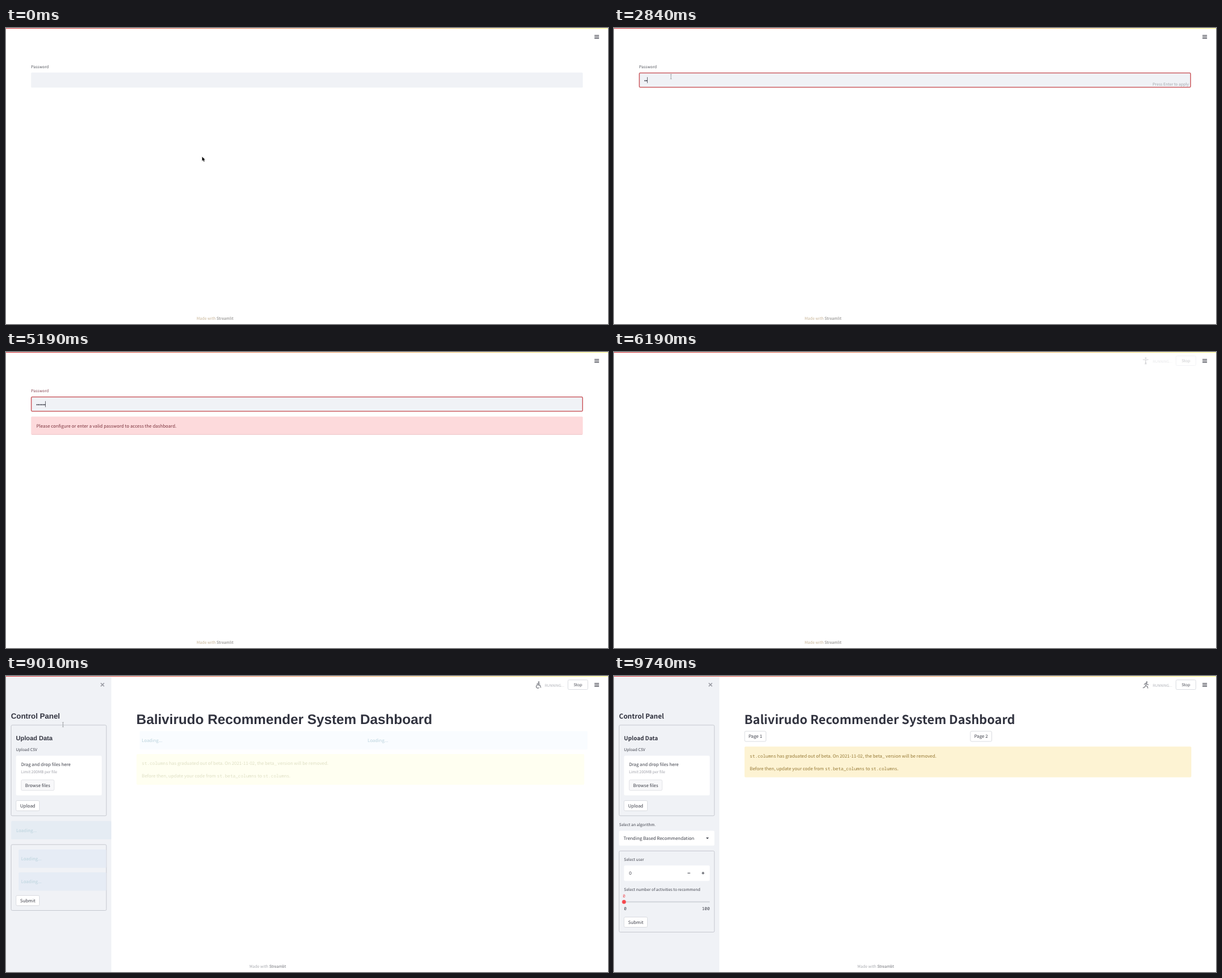
These frames come from a looping animation (1000 px wide and 493 px high, 9860 ms). An HTML page:

```html
<!DOCTYPE html>
<html lang="en">
<head>
<meta charset="utf-8">
<title>Dashboard login</title>
<style>
html, body { margin: 0; width: 100%; height: 100%; overflow: hidden; background: #fff; }
svg { display: block; width: 100vw; height: 100vh; }
text { font-family: "Noto Sans CJK JP", "Noto Sans CJK SC", "Noto Sans CJK KR", "Noto Sans CJK", "Open Sans", sans-serif; text-rendering: geometricPrecision; white-space: pre; }
.mono { font-family: "Noto Sans Mono", "DejaVu Sans Mono", monospace; }
.plain { font-family: "Liberation Sans", Arial, sans-serif; }
</style>
</head>
<body>
<svg id="stage" viewBox="0 0 1000 493" preserveAspectRatio="none"></svg>
<script>
const LOOP = 9860;
const SCALE = 1000 / 1920;  // page pixels to stage pixels
const CJK = 1.118;          // Latin glyphs in the CJK face are drawn larger
const INK = '#3f414b';
const stage = document.getElementById('stage');

const between = (t, a, b) => t >= a && t < b;
// value of the last [time, value] pair that has begun
const at = (t, pairs) => pairs.reduce((v, [start, next]) => t >= start ? next : v, null);

function text(x, y, str, size = 16, fill = INK, o = {}) {
  const px = size * SCALE / (o.face ? 1 : CJK);
  return `<text x="${x}" y="${y}" font-size="${px.toFixed(3)}" fill="${fill}"` +
    ` font-weight="${o.weight || 400}" text-anchor="${o.anchor || 'start'}" class="${o.face || ''}">${str}</text>`;
}
const mono = (x, y, str, fill, size = 14) => text(x, y, str, size, fill, { face: 'mono' });

function rect(x, y, x2, y2, fill, stroke = 'none', r = 2, w = 1) {
  return `<rect x="${x}" y="${y}" width="${x2 - x}" height="${y2 - y}" rx="${r}" fill="${fill}" stroke="${stroke}" stroke-width="${w}"/>`;
}
const path = (d, stroke, w = 1, fill = 'none') =>
  `<path d="${d}" fill="${fill}" stroke="${stroke}" stroke-width="${w}"/>`;
const fade = (a, body) => a > 0 ? `<g opacity="${a}">${body}</g>` : '';

function button(x, y, x2, label, y2 = y + 17, size = 16) {
  return rect(x, y, x2, y2, '#fff', '#d4d6db', 2, .8) +
    text((x + x2) / 2, (y + y2) / 2 + (size > 14 ? 2.8 : 2.4), label, size, INK, { anchor: 'middle' });
}

function chrome() {
  return '<defs><linearGradient id="bar"><stop stop-color="#d9474d"/><stop offset=".5" stop-color="#ecA070"/>' +
    '<stop offset="1" stop-color="#fbf88c"/></linearGradient></defs>' +
    '<rect width="1000" height="1.1" fill="url(#bar)"/>' +
    path('M977.5 12.4h7.6M977.5 14.9h7.6M977.5 17.4h7.6', '#4c4e57', 1.2);
}

function footer(x, warm) {
  return text(x, 486, 'Made with', 14, warm ? '#c6b294' : '#a6a8ad') +
    text(x + 33, 486, 'Streamlit', 14, warm ? '#7d7b78' : '#6a6c72');
}

const poses = {
  stand: 'M878.6 12.6l4.6 .5l4.6 -.5M883.2 13v4M883.2 16l-1 4.5M883.2 16l1 4.5',
  wheel: 'M884 12l1.2 3.6h2l1.2 4M881.5 13.5l3 -1.2l2.6 1.4M884 15a2.6 2.6 0 1 0 1.6 4',
  run: 'M884.4 11.8l-1.2 4.2l3 1.6l.6 3M883.2 16l-1.6 2.4l-3 1.4M880.6 14.6l1.6 -2l2.2 -.6l1.6 2.2l2 .4',
  ride: 'M884 12l-2 3.4l3 1.4l-.6 3.6M884 12.6l3.4 2M878.6 20.4h10'
};
function status(pose, a) {
  const hx = pose === 'stand' ? 883.2 : 885;
  return fade(a, `<circle cx="${hx}" cy="10.2" r="1.3" fill="#85878d"/>` + path(poses[pose], '#85878d', 1.3) +
    text(895, 17.6, 'RUNNING...', 12.9, '#b0b2b8') + button(933.5, 6.5, 966.5, 'Stop', 22.5, 14));
}

const arrow = () => path('M325.7 214.2v7.4l1.7 -1.5l1.1 2.6l1.4 -.6l-1.1 -2.5h2.2z', '#fff', .3, '#000');
const beam = () => path('M93.4 77.2h.8l.5 .4l.5 -.4h.8M94.7 77.5v7M93.4 84.8h.8l.5 -.4l.5 .4h.8', '#85878c', .7);

function field(s) {
  let out = text(41.8, 67.1, 'Password', 14, s.label, { weight: s.label === '#a7b3cb' ? 700 : 400 }) +
    rect(41.6, 74.3, 958.2, 99.2, '#f0f2f6', 'none', 1.5) +
    fade(s.focus, rect(42.1, 74.8, 957.7, 98.7, 'none', '#c94f54', 1.5, 1.3));
  for (let i = 0; i < s.dots; i++) out += `<circle cx="${51.5 + i * 2.55}" cy="87.8" r="1.05" fill="#3a3b46"/>`;
  if (s.caret) out += path(`M${50.4 + s.dots * 2.52} 81.8v10`, '#4a4b55', .8);
  if (s.hint) out += text(955, 96.4, 'Press Enter to apply', 14, '#a1a3a9', { anchor: 'end' });
  return out;
}

const errorBox = () => rect(41.6, 107.6, 958.2, 137.8, '#fddadc', 'none', 1.5) +
  path('M43 137.4h914', '#ecc3c6', .8) +
  text(50.4, 125.9, 'Please configure or enter a valid password to access the dashboard.', 16, '#7d353f');

function loginState(t) {
  return {
    label: at(t, [[0, '#55575f'], [4570, '#85404e'], [6190, '#a7b3cb']]),
    focus: at(t, [[0, 0], [990, .5], [1110, 1], [6190, 0], [7050, .5], [7170, 1]]),
    dots: at(t, [[0, 0], [2470, 1], [2840, 2], [3090, 3], [3340, 4], [3710, 5], [3960, 6],
      [6190, 0], [8030, 1], [8280, 2]]),
    caret: between(t, 1110, 1480) || between(t, 2100, 4690) || between(t, 5190, 6190) ||
      between(t, 7170, 7660) || t >= 8030,
    hint: between(t, 2470, 4330) || between(t, 8030, 8650)
  };
}

function login(t) {
  const blank = between(t, 6190, 6430) || t >= 8770;
  const run = at(t, [[0, 0], [4330, .3], [4450, .8], [4570, .4], [4690, 0],
    [6190, .3], [6310, .7], [6430, .35], [6550, 0], [8650, .3], [8770, .7]]);
  return (blank ? '' : field(loginState(t))) +
    fade(at(t, [[0, 0], [4570, .5], [4690, 1], [6190, 0]]), errorBox()) +
    status('stand', run) + footer(316.8, true) +
    (t < 120 ? arrow() : between(t, 120, 3090) || t >= 6550 ? beam() : '');
}

function heading(x, y, str, size, weight, ready) {
  return text(x, y, str, size, '#31333f', ready ? { weight } : { weight: 700, face: 'plain' });
}

function loading(x, y, x2, fill, tx = x + 9) {
  return rect(x, y, x2, y + 30.5, fill, 'none', 1.5) + text(tx, y + 18.4, 'Loading...', 16, '#b9d2dc');
}

function upload(ready) {
  return rect(8.5, 81.8, 166.8, 232.8, 'none', '#c3c6cd', 2, .9) +
    heading(16.6, 106.8, 'Upload Data', 20, 600, ready) +
    text(16.6, 125.4, 'Upload CSV', 14) +
    rect(16.6, 132.8, 159, 198.8, '#fff') +
    text(25, 150.2, 'Drag and drop files here') +
    text(25, 162.2, 'Limit 200MB per file', 14, '#a0a2aa') +
    rect(25.3, 173, 80, 190.6, '#f8f8fa', '#dcdde2', 2, .8) +
    text(52.6, 184.7, 'Browse files', 16, INK, { anchor: 'middle' }) +
    button(16.7, 207.5, 55.5, 'Upload');
}

const waiting = a => fade(a, loading(8.5, 241.5, 175, '#e5ecf3', 17)) +
  rect(8.5, 280.8, 166.8, 390.5, 'none', '#c3c6cd', 2, .9) +
  fade(a, loading(21, 289, 166.5, '#e6ecf5', 25) + loading(21, 327, 166.5, '#e6ecf5', 25)) +
  button(16.7, 365.5, 55.5, 'Submit');

const options = () => text(8.5, 250, 'Select an algorithm.', 14) +
  rect(8.3, 257.8, 166.8, 282.6, '#fff') +
  text(15.8, 273, 'Trending Based Recommendation') +
  path('M152.8 269h4.8l-2.4 2.5z', 'none', 0, INK) +
  rect(8.5, 291.4, 166.8, 426.6, 'none', '#c3c6cd', 2, .9) +
  text(16.6, 307.8, 'Select user', 14) +
  rect(16.6, 315.4, 159, 341.2, '#fff') +
  text(25, 331, '0') +
  path('M122.2 328.2h4.4M145.7 328.2h4.4M147.9 326v4.4', INK, 1.1) +
  text(16.6, 357.9, 'Select number of activities to recommend', 14) +
  mono(14.4, 369.4, '0', '#f0575b') +
  path('M16.6 376.2h142.4', '#d3d6dc', 2) +
  '<circle cx="16.6" cy="376.2" r="3.2" fill="#f5484d"/>' +
  mono(16.6, 389.6, '0', INK) + mono(146, 389.6, '100', INK) +
  button(16.7, 401.5, 55.5, 'Submit');

function notice(dy, bg, fill, right) {
  return rect(216.8, 117.5 + dy, right, 168.7 + dy, bg) +
    mono(225.6, 135.7 + dy, 'st.columns', fill) +
    text(270.8, 135.7 + dy, 'has graduated out of beta. On 2021-11-02, the beta_ version will be removed.', 16, fill) +
    text(225.6, 156.7 + dy, 'Before then, update your code from', 16, fill) +
    mono(350.6, 156.7 + dy, 'st.beta_columns', fill) +
    text(418, 156.7 + dy, 'to', 16, fill) +
    mono(427, 156.7 + dy, 'st.columns', fill) +
    text(470.4, 156.7 + dy, '.', 16, fill);
}

function dashboard(t) {
  const ready = t >= 9370;          // web font has arrived
  const filled = t >= 9250;         // widgets have replaced the placeholders
  const soft = at(t, [[8890, .4], [9010, 1]]);
  const pose = at(t, [[8890, 'stand'], [9010, 'wheel'], [9250, 'ride'], [9370, 'wheel'], [9620, 'ride'], [9740, 'run']]);
  let out = rect(0, 1.1, 175, 493, '#f0f2f6', 'none', 0) +
    path('M157.4 11.7l5.6 5.6M163 11.7l-5.6 5.6', '#9a9ca4', 1.6) +
    heading(8.3, 71.1, 'Control Panel', 24, 600, ready) +
    upload(ready) + (filled ? options() : waiting(soft)) +
    heading(216.6, 79.6, 'Balivirudo Recommender System Dashboard', 44, 700, ready);
  out += filled
    ? button(217, 92, 252.5, 'Page 1') + button(592, 92, 627.5, 'Page 2') +
      notice(0, '#fdf3d3', '#977a36', 959)
    : fade(soft, loading(222, 92, 590, '#f9fcff', 225.6) + loading(590, 92, 966, '#f9fcff', 600.7) +
      notice(12.6, '#fffff1', '#dedfc4', 960.5));
  return out + status(pose, 1) + footer(404.2, false) + (ready ? '' : beam());
}

let shown = '';
function draw(ms) {
  const t = ms % LOOP;
  const view = chrome() + (t < 8890 ? login(t) : dashboard(t));
  if (view !== shown) stage.innerHTML = shown = view;
}

const begin = performance.now();
function tick() {
  draw(performance.now() - begin);
  requestAnimationFrame(tick);
}
tick();
</script>
</body>
</html>
```
